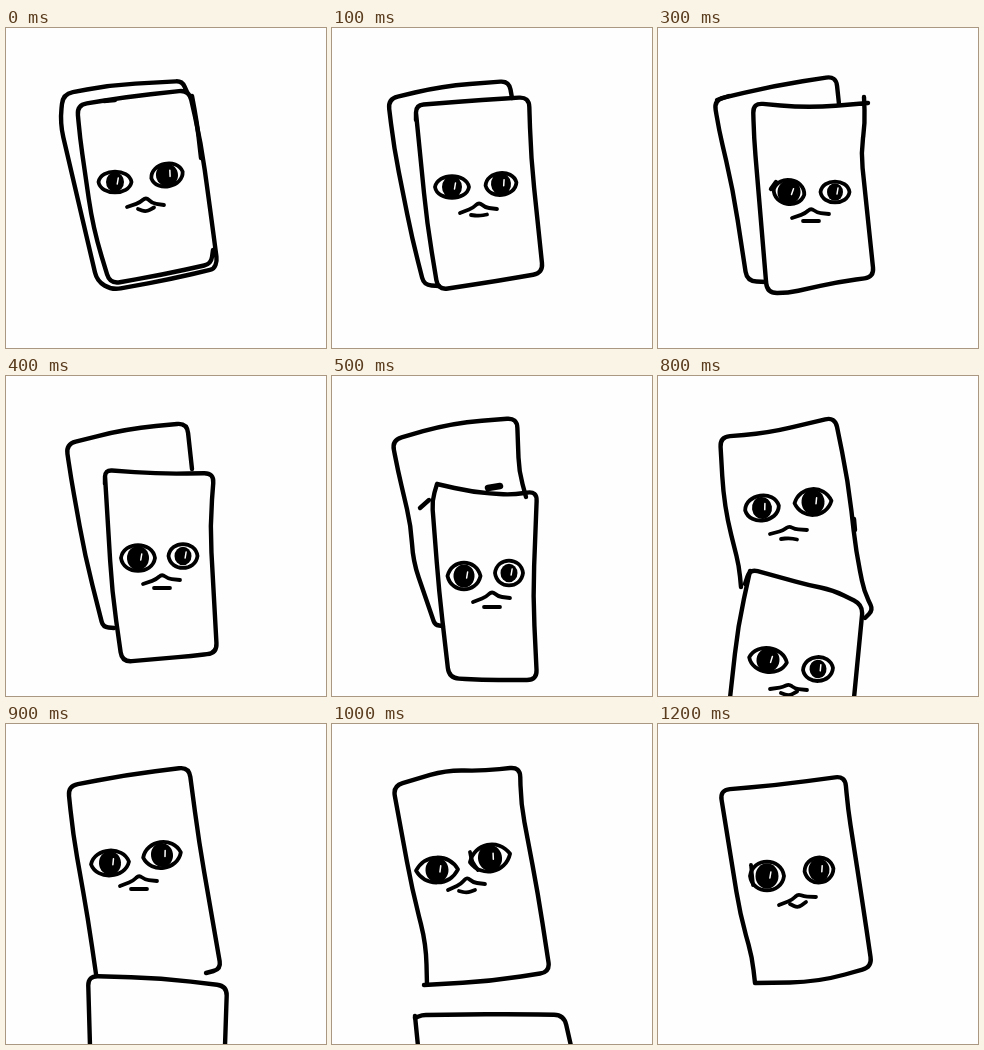
An HTML page for the animation above (1300 ms loop, 320 px wide and 320 px high).

```html
<!DOCTYPE html>
<html lang="en">
<head>
<meta charset="utf-8">
<title>Sliding cards</title>
<style>
html, body { margin: 0; width: 100%; height: 100%; overflow: hidden; background: #fefefe; }
svg { display: block; width: 100vw; height: 100vh; }
</style>
</head>
<body>
<svg id="stage" viewBox="0 0 320 320" fill="none" stroke="#000" stroke-linecap="round" stroke-linejoin="round"></svg>
<script>
const LOOP = 1300;
const stage = document.getElementById("stage");
const poses = [];
let layer;

function add(parent, tag, attrs) {
  const el = document.createElementNS("http://www.w3.org/2000/svg", tag);
  for (const key in attrs) el.setAttribute(key, attrs[key]);
  return parent.appendChild(el);
}

// Pen line through vertices: tight rounding at corners, wide at gentle bends.
function pen(text, width = 4.4) {
  const n = text.split(" ").map(Number), pts = [];
  for (let i = 0; i < n.length; i += 2) pts.push([n[i], n[i + 1]]);
  const dist = (a, b) => Math.hypot(b[0] - a[0], b[1] - a[1]);
  const toward = (a, b, r) => a.map((v, i) => v + (b[i] - v) * r / dist(a, b));
  let d = "M" + pts[0];
  for (let i = 1; i < pts.length - 1; i++) {
    const [a, b, c] = pts.slice(i - 1, i + 2), ab = dist(a, b), bc = dist(b, c);
    const turn = ((b[0] - a[0]) * (c[0] - b[0]) + (b[1] - a[1]) * (c[1] - b[1])) / (ab * bc);
    const r = Math.min(ab / 2, bc / 2, turn < 0.75 ? 10 : 30);
    d += `L${toward(b, a, r)}Q${b} ${toward(b, c, r)}`;
  }
  add(layer, "path", { d: d + "L" + pts[pts.length - 1], "stroke-width": width });
}

// Almond outline, dark pupil and a thin glint.
function eye(cx, cy, rx, ry, pupil, tilt = 0, round = 0.85) {
  const g = add(layer, "g", { transform: `translate(${cx} ${cy}) rotate(${tilt})` });
  const k = rx * round, h = ry * 1.33, gx = pupil / 4;
  add(g, "path", {
    d: `M${-rx} 0C${-k} ${-h} ${k} ${-h} ${rx} 0C${k} ${h} ${-k} ${h} ${-rx} 0Z`,
    "stroke-width": 3.8
  });
  add(g, "ellipse", { rx: pupil, ry: Math.min(pupil * 1.1, ry), fill: "#000", stroke: "none" });
  add(g, "path", { d: `M${gx + 1} -4L${gx} 2`, stroke: "#fefefe", "stroke-width": 1.5 });
}

// Peaked upper lip at x, y with ends dropping by left and right; short lower lip.
function mouth(x, y, left, right, low, sag = 0) {
  const p = (dx, dy) => `${x + dx} ${y + dy}`;
  pen([p(-19, left), p(-6, left * 0.5), p(0, -1), p(6, right * 0.75), p(18, right)].join(" "), 3.8);
  pen([p(-8, low), p(0, low + sag), p(8, low - sag / 2)].join(" "), 3.8);
}

function pose(at, draw) {
  layer = add(stage, "g", { display: "none" });
  draw();
  poses.push({ at, layer });
}

pose(0, () => {
  pen("181 64 176 53 105 57 57 66 54 95 68 155 91 253 106 262 165 251 208 241 211 233 204 180 195 115 183 62 120 69 71 77 74 110 87 200 104 256 155 247 205 236 207 222");
  pen("186 68 191 95 195 130");
  pen("98 73 109 72");
  eye(109, 154, 16.5, 10.5, 9);
  eye(161, 147, 16, 11.5, 11, -12);
  mouth(140, 170, 9, 7, 11, 3);
});

pose(100, () => {
  pen("180 70 177 53 110 58 56 71 62 120 80 210 92 257 107 258");
  pen("84 92 84 77 150 72 197 69 199 130 211 245 165 253 106 262 95 195 84 85");
  eye(120, 159, 17, 11, 10);
  eye(169, 156, 15.5, 11, 10, -6);
  mouth(147, 175, 10, 6, 12, 1);
});

pose(300, () => {
  pen("181 76 178 48 115 58 56 72 61 102 75 162 89 253 108 254");
  pen("59 72 71 68");
  pen("210 75 150 80 95 75 96 110 109 265 130 265 180 254 216 249 214 230 203 125 207 95 206 69");
  eye(131, 164, 15.5, 12, 11.5, 10);
  eye(177, 164, 14.5, 10.5, 8);
  pen("113 161 118 154");
  mouth(153, 181, 9, 5, 12);
});

pose(400, () => {
  pen("186 93 181 47 120 53 60 68 65 102 79 180 97 251 108 252");
  pen("99 108 99 94 155 98 208 97 204 150 211 277 185 280 116 286 106 215 99 100");
  eye(132, 182, 17, 13, 11);
  eye(177, 180, 14.5, 12, 8.5);
  mouth(156, 199, 9, 5, 13);
});

pose(500, () => {
  pen("194 121 187 95 185 42 120 47 60 64 66 95 79 150 81 185 103 249 111 250");
  pen("88 132 97 124");
  pen("105 108 140 116 180 119 205 115 201 220 205 304 150 304 117 302 107 215 100 125 105 108");
  pen("156 112 168 110", 6.5);
  eye(132, 200, 16.5, 13.5, 10.5, 0, 0.75);
  eye(177, 197, 14, 12.5, 8.5);
  mouth(160, 216, 10, 6, 15);
});

pose(700, () => {
  pen("202 166 193 110 184 80 182 40 145 50 65 60 73 110 78 175 86 217");
  pen("103 150 107 132 135 133 175 149 215 165 212 195 195 265 178 322");
  pen("106 150 87 220 74 275 62 322");
  pen("91 130 97 121 113 122 119 130");
  pen("98 128 106 131 114 127", 8);
  eye(161, 121, 18, 11.5, 9.5, 0, 0.7);
  eye(120, 230, 16.5, 17, 12.5);
  eye(157, 250, 17, 13, 11);
  pen("107 261 107.5 261.5", 3.8);
  pen("114 262 131 263 141 269", 3.8);
  pen("121 275 131 276", 3.8);
});

pose(800, () => {
  pen("83 211 81 190 66 130 62 61 110 57 177 41 190 105 198 175 206 215 215 234 207 242");
  pen("196 143 197 154");
  pen("87 208 92 193 150 209 175 214 205 229 196 322");
  pen("92 195 80 250 72 322");
  eye(104, 132, 17, 12.5, 10, -8);
  eye(155, 126, 18.5, 13, 11.5, -4, 0.65);
  eye(110, 284, 19, 12, 11.5, 8, 0.7);
  eye(160, 293, 15, 12, 8.5, -4);
  mouth(131, 151, 7, 3, 12, -1);
  mouth(131, 309, 4, 5, 8, 3);
});

pose(900, () => {
  pen("90 250 82 195 67 110 62 62 120 51 183 43 193 118 215 245 200 249");
  pen("84 322 82 252 155 254 221 262 219 322");
  eye(104, 139, 19, 12.5, 11, -4, 0.75);
  eye(156, 131, 19, 13, 11, -8, 0.7);
  mouth(133, 152, 10, 5, 13);
});

pose(1000, () => {
  pen("95 261 94 220 80 165 61 62 115 46 150 47 188 43 189 80 206 170 218 248 160 257 92 261");
  pen("86 322 83 292");
  pen("83 294 90 291 180 290 232 291 239 322");
  eye(105, 146, 21, 12.5, 11.5, -2, 0.55);
  eye(158, 134, 20.5, 13.5, 12, -12, 0.6);
  pen("138 128 140 138 146 146", 3.8);
  mouth(135, 154, 12, 6, 13, 2);
});

pose(1200, () => {
  pen("97 259 94 233 82 190 62 66 120 61 187 52 190 85 204 175 214 243 160 258 97 259");
  eye(109, 152, 17, 14.5, 11.5);
  eye(161, 146, 14.5, 12.5, 10.5, -6);
  pen("93 141 95 161", 3.8);
  mouth(140, 171, 10, 2, 9, 4);
});

let shown = -1;
function update(time) {
  const t = time % LOOP;
  const now = poses.filter(p => p.at <= t).length - 1;
  if (now === shown) return;
  poses.forEach((p, i) => p.layer.setAttribute("display", i === now ? "inline" : "none"));
  shown = now;
}

const start = performance.now();
function tick() {
  update(performance.now() - start);
  requestAnimationFrame(tick);
}
tick();
</script>
</body>
</html>
```
